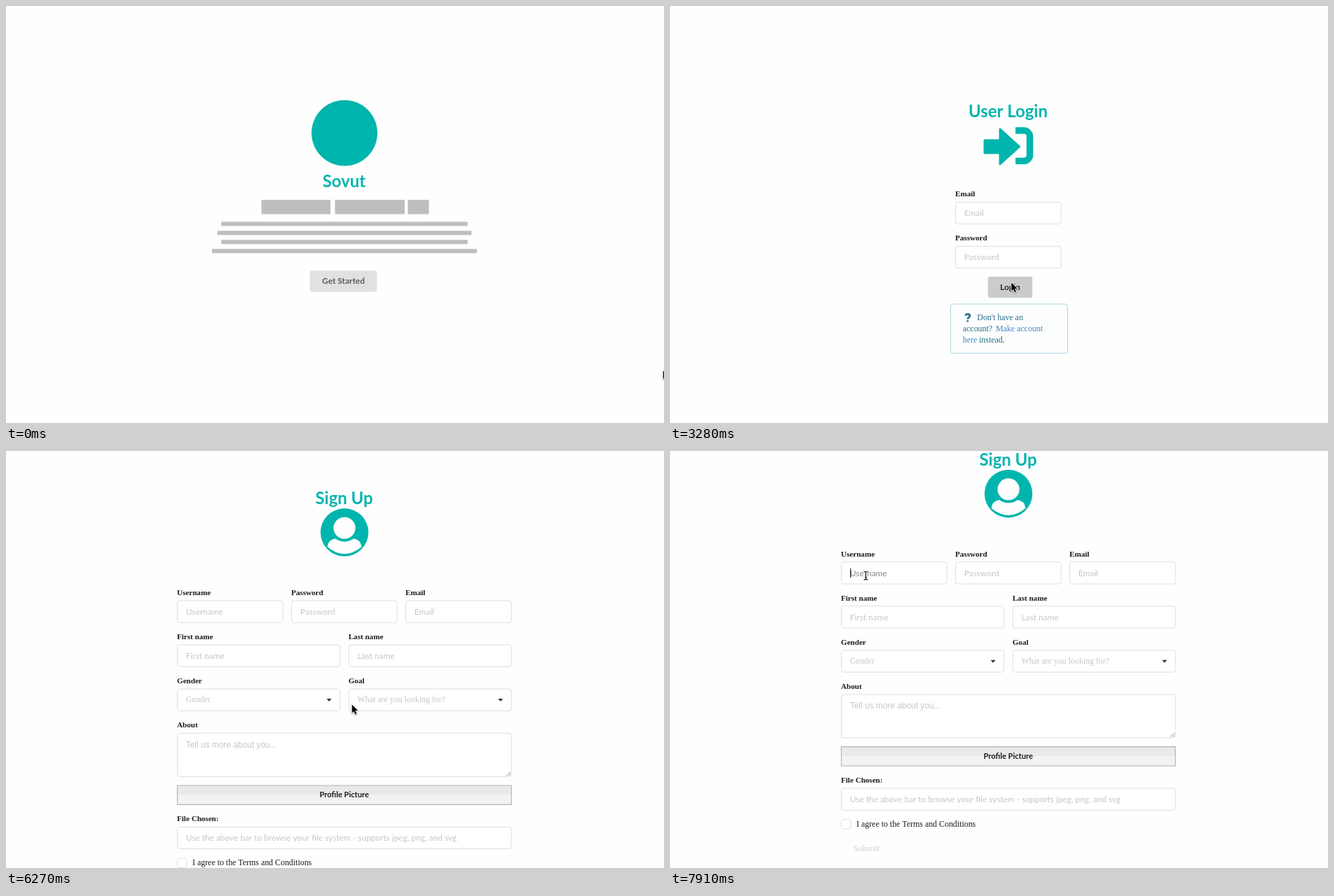
Recreate the animation shown at these times as an HTML page with a canvas. Size 939 px wide and 596 px high, loop 8000 ms.

```html
<!DOCTYPE html>
<html lang="en">
<head>
<meta charset="utf-8">
<title>Sign up walkthrough</title>
<style>
  html, body { margin: 0; width: 100%; height: 100%; overflow: hidden; background: #fefefe; }
  canvas { display: block; }
</style>
</head>
<body>
<canvas id="stage" width="939" height="596"></canvas>
<script>
const ctx = document.getElementById('stage').getContext('2d');
const LOOP = 8000, STEP = 148.88; // the picture advances in steps of this many ms
const TEAL = '#00b5ad', INK = '#1c1c1d', HINT = '#c6c6c6', BORDER = '#dedede', PAPER = '#fefefe';
const FONT = {
  title: 'bold 23.9px Lato, sans-serif',
  button: 'bold 11.9px Lato, sans-serif',
  picker: 'bold 11.1px Lato, sans-serif',
  input: '11.9px Lato, sans-serif',
  label: 'bold 11.1px "Liberation Serif", serif',
  serif: '11.9px "Liberation Serif", serif',
  area: '11.9px "Liberation Sans", sans-serif'
};

// Scene changes, counted in steps.
const LOGIN = 21, SIGN_UP = 39, FOCUS = 53;

const glides = [
  { from: 4, to: 6, x: 841, y: 516 },
  { from: 7, to: 14, x: 486.5, y: 394 },
  { from: 26, to: 28, x: 709, y: 216 },
  { from: 28, to: 29, x: 672, y: 407 },
  { from: 30, to: 37, x: 517, y: 460 },
  { from: 41, to: 43, x: 490, y: 336 },
  { from: 49, to: 52, x: 279.5, y: 178 }
];

const shapes = {
  arrow: new Path2D('M.8 1.2v12l2.7-2.5 1.9 4.4 2.1-.9-1.9-4.3h3.7Z'),
  hand: new Path2D('M-.8 2c1-.7 2 0 2 1V6.7c.6-.9 2-.7 2.2.3.7-.7 1.9-.4 2 .5.8-.5 1.9 0 1.9 1.2V11c0 2-.9 2.6-1 4.4H.6C.4 13.6-1.6 11.8-3.1 9.6-3.7 8.6-2.3 7.8-1.4 8.8L-.8 9.4Z'),
  knuckles: new Path2D('M1.8 10v3M3.6 10v3M5.4 10v3'),
  beam: new Path2D('M-3-6Q0-6 0-4V4Q0 6-3 6M3-6Q0-6 0-4V4Q0 6 3 6M-1.5 2.5h3'),
  loginArrow: new Path2D('M449 192H471V176L498.5 201 471 226V210H449Z'),
  door: new Path2D('M493 178H505a8.5 8.5 0 0 1 8.5 8.5V213a8.5 8.5 0 0 1-8.5 8.5H493'),
  question: new Path2D('M421.8 442.6C422.4 439.6 427.8 439.7 427.8 443 427.8 445.3 424.8 445.2 424.8 447.6M424.8 449.2v2.4'),
  shoulders: new Path2D('M458.5 126Q460 115.5 470 114.3Q483 123 496 114.3Q506 115.5 507.5 126Q483 146 458.5 126Z')
};

const ramp = (step, from, to) => Math.min(1, Math.max(0, (step - from) / (to - from)));
const smooth = p => p * p * (3 - 2 * p);
const easeOut = (p, power) => 1 - (1 - p) ** power;

function text(str, x, y, font, color = INK, align = 'left') {
  ctx.font = font;
  ctx.fillStyle = color;
  ctx.textAlign = align;
  ctx.fillText(str, x, y);
}

function rect(x, y, w, h, color) {
  ctx.fillStyle = color;
  ctx.fillRect(x, y, w, h);
}

function box(x, y, w, h, border = BORDER, fill = '#fff') {
  ctx.beginPath();
  ctx.roundRect(x, y, w, h, 3.4);
  ctx.fillStyle = fill;
  ctx.fill();
  if (!border) return;
  ctx.strokeStyle = border;
  ctx.lineWidth = 1;
  ctx.stroke();
}

function disc(x, y, r, color) {
  ctx.fillStyle = color;
  ctx.beginPath();
  ctx.arc(x, y, r, 0, 2 * Math.PI);
  ctx.fill();
}

function stroke(path, color, width) {
  ctx.strokeStyle = color;
  ctx.lineWidth = width;
  ctx.stroke(path);
}

function field(label, x, y, w, hint = label, font = FONT.input, color = HINT) {
  text(label, x - 0.5, y - 8, FONT.label);
  box(x, y, w, 31.3);
  text(hint, x + 12.3, y + (font === FONT.serif ? 19 : 20), font, color);
}

function dropdown(label, x, y, w, hint) {
  field(label, x, y, w, hint, FONT.serif);
  ctx.fillStyle = '#333';
  ctx.fill(new Path2D(`M${x + w - 19} ${y + 14}h7l-3.5 4Z`));
}

function button(label, x, y, w, hover) {
  const grey = 225 - 22 * hover, ink = 90 - 50 * hover;
  box(x, y, w, 30.3, null, `rgb(${grey - 1},${grey},${grey + 1})`);
  text(label, x + w / 2, y + 19.2, FONT.button, `rgb(${ink},${ink},${ink})`, 'center');
}

function home(step) {
  const grey = '#bdbebf';
  disc(483, 181.5, 47, TEAL);
  text('Sovut', 482.5, 259, FONT.title, TEAL, 'center');
  rect(364.5, 277, 98.5, 20.5, grey);
  rect(469.5, 277, 99.5, 20.5, grey);
  rect(573.5, 277, 30, 20.5, grey);
  [351.5, 362.5, 351.5, 378].forEach((w, i) => rect(483 - w / 2, 308.4 + 12.95 * i, w, 6, grey));
  button('Get Started', 433.5, 378.2, 96, ramp(step, 14, 17));
}

function login(step, linkHover) {
  text('User Login', 482.5, 159, FONT.title, TEAL, 'center');
  ctx.fillStyle = TEAL;
  ctx.fill(shapes.loginArrow);
  stroke(shapes.loginArrow, TEAL, 3);
  stroke(shapes.door, TEAL, 9.5);
  field('Email', 407.5, 280.3, 150.7);
  field('Password', 407.5, 343.4, 150.7);
  button('Login', 453.7, 386.8, 63.5, step > LOGIN ? 1 - ramp(step, 26, 28) : 0);

  const note = '#276f86', link = linkHover ? '#1e70bf' : '#4183c4';
  box(400.5, 426, 167, 70.2, '#a9d5de', '#fcfefe');
  stroke(shapes.question, note, 2.8);
  text("Don't have an", 438.3, 449, FONT.serif, note);
  text('account?', 417.8, 465, FONT.serif, note);
  text('Make account', 465, 465, FONT.serif, link);
  text('here', 417.8, 481, FONT.serif, link);
  text('instead.', 441, 481, FONT.serif, note);
}

function signUp(step) {
  const focused = step >= FOCUS;
  const left = 244.5, full = 476.7, half = 232, third = 150.7;
  ctx.save();
  ctx.translate(0, 11 - 55.3 * smooth(ramp(step, 43.85, 47.85)));
  text('Sign Up', 482.5, 65, FONT.title, TEAL, 'center');
  disc(483, 105.3, 34.2, TEAL);
  disc(483, 99, 15.6, PAPER);
  ctx.fill(shapes.shoulders);

  field('Username', left, 203, third, 'Username', FONT.input, focused ? '#858585' : HINT);
  field('Password', 407.5, 203, third);
  field('Email', 570.5, 203, third);
  field('First name', left, 266, half);
  field('Last name', 489.2, 266, half);
  dropdown('Gender', left, 329, half, 'Gender');
  dropdown('Goal', 489.2, 329, half, 'What are you looking for?');

  text('About', 244, 384.3, FONT.label);
  box(left, 392.3, full, 62);
  text('Tell us more about you...', 256.8, 412.7, FONT.area, HINT);
  stroke(new Path2D('M714.5 453l5.5-5.5M718 453l2-2'), '#777', 0.9);

  rect(left, 467, full, 28, '#f2f2f2');
  rect(left, 467, full, 13, '#e9e9e9');
  ctx.strokeStyle = '#b2b4b4';
  ctx.lineWidth = 1.2;
  ctx.strokeRect(left, 467, full, 27.3);
  text('Profile Picture', 482.7, 484.3, FONT.picker, INK, 'center');

  field('File Chosen:', left, 526.3, full,
    'Use the above bar to browse your file system - supports jpeg, png, and svg');
  box(left, 571, 13.3, 13.3);
  text('I agree to the Terms and Conditions', 266, 581.3, FONT.serif);
  text('Submit', 261.8, 616.5, FONT.button, '#dcdcdc');
  if (focused) rect(257.2, 212, 1.1, 13.5, '#111');
  ctx.restore();
}

// Sideways motion settles sooner than vertical, which bends the path.
function pointerAt(step) {
  let x = 937, y = 520;
  for (const glide of glides) {
    const p = ramp(step, glide.from, glide.to);
    x += (glide.x - x) * easeOut(p, 3.2);
    y += (glide.y - y) * easeOut(p, 2.3);
  }
  return { x, y };
}

function pointerKind(step) {
  if (step >= 52) return 'beam';
  const overLink = (step >= 19 && step < LOGIN) || (step >= 36 && step < 42);
  return overLink ? 'hand' : 'arrow';
}

function drawPointer({ x, y }, kind) {
  const path = shapes[kind];
  ctx.save();
  ctx.translate(x, y);
  if (kind === 'beam') {
    stroke(path, '#fff', 2.4);
    stroke(path, '#111', 1.1);
  } else if (kind === 'hand') {
    ctx.fillStyle = '#fff';
    ctx.fill(path);
    stroke(path, '#111', 1.2);
    stroke(shapes.knuckles, '#333', 0.7);
  } else {
    ctx.shadowColor = 'rgba(0,0,0,.4)';
    ctx.shadowBlur = 2;
    ctx.shadowOffsetY = 1;
    stroke(path, '#fff', 1.8);
    ctx.shadowColor = 'transparent';
    ctx.fillStyle = '#000';
    ctx.fill(path);
  }
  ctx.restore();
}

function draw(time) {
  const step = Math.floor(time / STEP), kind = pointerKind(step);
  rect(0, 0, 939, 596, PAPER);
  ctx.lineJoin = 'round';
  if (step < LOGIN) home(step);
  else if (step < SIGN_UP) login(step, kind === 'hand');
  else signUp(step);
  drawPointer(pointerAt(step), kind);
}

const start = performance.now();
function tick() {
  draw((performance.now() - start) % LOOP);
  requestAnimationFrame(tick);
}
tick();
</script>
</body>
</html>
```
